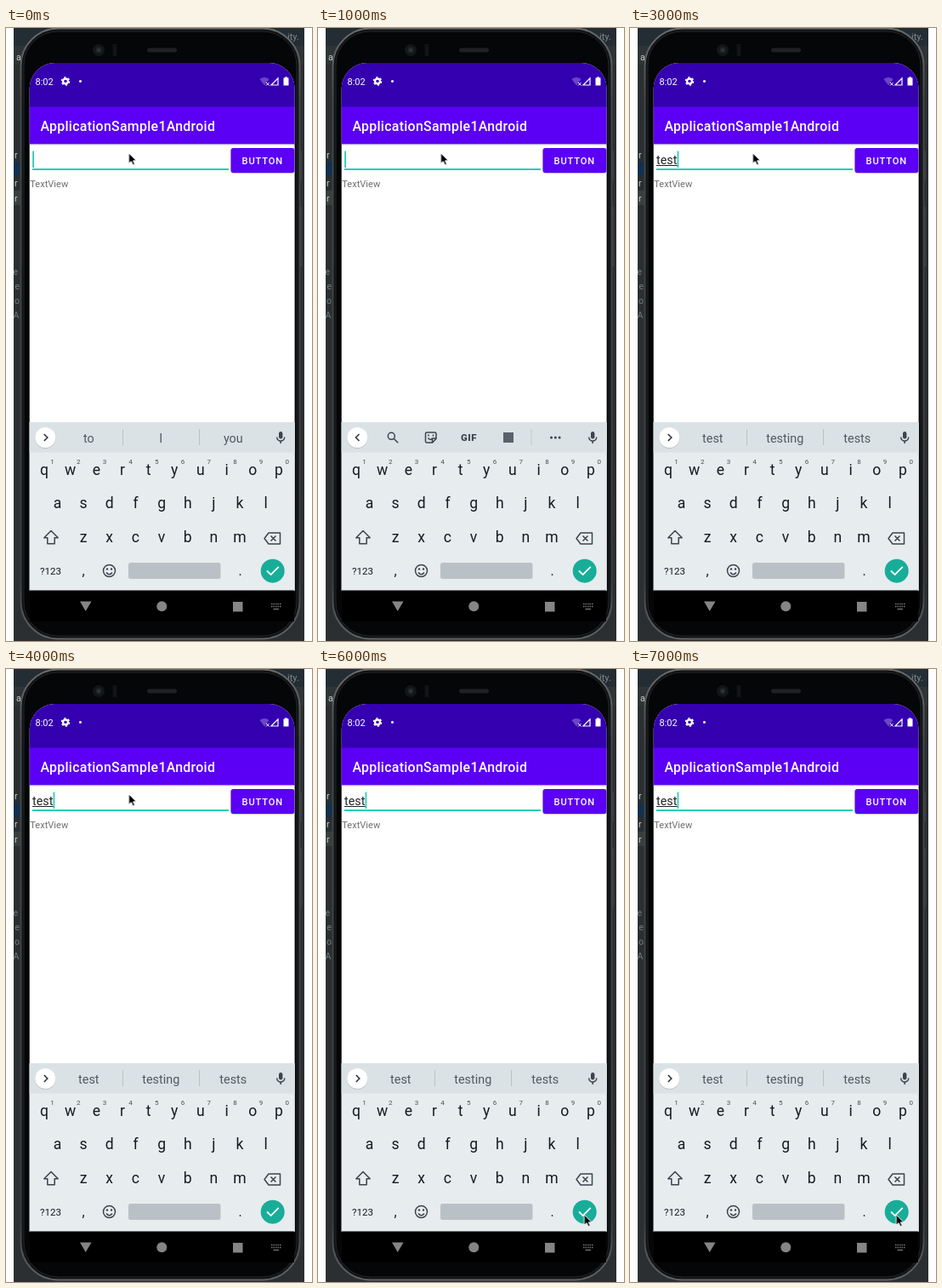
Animation of 360x720 px, one loop 8 s. Source, as an HTML page:

```html
<!DOCTYPE html>
<html lang="en">
<head>
<meta charset="utf-8">
<title>Typing on a phone</title>
<style>
html, body { margin: 0; width: 100%; height: 100%; overflow: hidden; background: #fff; }
svg { display: block; width: 360px; height: 720px; font-family: Roboto, sans-serif; }
.mid { text-anchor: middle; }
.line { fill: none; stroke: #3c454b; stroke-width: 1.5; }

/* Every change is a hard cut on an 8 s clock. */
.idle, .tools, .half, .full, .words, .caret, .mouse { animation: 8s step-end infinite; }
.idle { animation-name: idle; }
.tools { animation-name: tools; }
.words { animation-name: words; }
.half { animation-name: half; }
.full { animation-name: full; }
.caret { animation-name: caret; }
.mouse { animation-name: mouse; }
@keyframes idle { 0% { visibility: visible } 12.5%, 100% { visibility: hidden } }
@keyframes tools { 0% { visibility: hidden } 12.5% { visibility: visible } 25%, 100% { visibility: hidden } }
@keyframes words { 0% { visibility: visible } 12.5% { visibility: hidden } 25%, 100% { visibility: visible } }
@keyframes half { 0% { visibility: hidden } 25% { visibility: visible } 37.5%, 100% { visibility: hidden } }
@keyframes full { 0% { visibility: hidden } 37.5%, 100% { visibility: visible } }
@keyframes caret {
  0% { transform: translateX(0) }
  25% { transform: translateX(12px) }
  37.5%, 100% { transform: translateX(24.4px) }
}
@keyframes mouse {
  0% { transform: translate(144.5px, 147px) }
  62.5% { transform: translate(318.5px, 550.5px) }
  75%, 100% { transform: translate(313.2px, 641px) }
}
</style>
</head>
<body>
<svg viewBox="0 0 360 720">
  <defs>
    <clipPath id="stage"><rect x="9" width="342" height="720"/></clipPath>
    <clipPath id="screen"><path d="M27.700 661V71a30 30 0 0 1 30-30H309.600a30 30 0 0 1 30 30V661Z"/></clipPath>
    <linearGradient id="shade" x2="0" y2="1">
      <stop stop-color="#000" stop-opacity=".2"/><stop offset="1" stop-color="#000" stop-opacity="0"/>
    </linearGradient>
    <linearGradient id="rim" x2="0" y2="1">
      <stop stop-color="#6a6c6d"/><stop offset=".12" stop-color="#44474a"/>
      <stop offset=".9" stop-color="#3a3d3f"/><stop offset="1" stop-color="#606264"/>
    </linearGradient>
  </defs>

  <g clip-path="url(#stage)">
    <!-- editor behind the phone -->
    <rect x="9" width="342" height="720" fill="#2b2f31"/>
    <rect x="9" width="342" height="21" fill="#232d33"/>
    <rect x="9" y="21" width="342" height="22" fill="#2f3537"/>
    <rect x="9" y="157" width="9" height="17" fill="#12304b"/>
    <rect x="9" y="191" width="9" height="17" fill="#37413c"/>
    <g id="editor" font-size="10.5"></g>
    <text x="331" y="14" font-size="11" fill="#7e898f">ity.</text>

    <!-- phone body -->
    <rect x="17.500" y=".5" width="328" height="717" rx="44" fill="#111314" stroke="url(#rim)" stroke-width="2"/>
    <rect x="21" y="4" width="321" height="710" rx="40" fill="#050607" stroke="#222527"/>
    <path d="M347 144v35M347 210v70" stroke="#3b3f42" stroke-width="2"/>
    <circle cx="109" cy="26" r="7" fill="#131517"/>
    <circle cx="109" cy="26" r="3.400" fill="#22262a"/>
    <circle cx="109" cy="26" r="1.300" fill="#3b4148"/>
    <path d="M128 19v14" stroke="#111315" stroke-width="5"/>
    <rect x="166" y="23.500" width="35" height="5" rx="2.500" fill="#1f2123"/>
  </g>

  <g clip-path="url(#screen)">
    <rect x="27" y="41" width="313" height="620" fill="#fff"/>
    <rect x="27" y="41" width="313" height="52" fill="#3400b0"/>
    <rect x="27" y="92.500" width="313" height="43.800" fill="#5b00f4"/>
    <rect x="27" y="136.300" width="313" height="2.200" fill="url(#shade)"/>

    <!-- status bar -->
    <g fill="#fff">
      <text x="34.500" y="66.700" font-size="11">8:02</text>
      <circle cx="70" cy="62.500" r="2.900" fill="none" stroke="#fff" stroke-width="2.200"/>
      <circle cx="70" cy="62.500" r="4.500" fill="none" stroke="#fff" stroke-width="1.600" stroke-dasharray="2.350 2.362"/>
      <circle cx="87.500" cy="62.500" r="1.500"/>
      <path d="M298.500 60q5.500-4 11 0l-5.500 7.500z" opacity=".27"/>
      <path d="M306 64l3.500 3.500m0-3.500l-3.500 3.500" stroke="#fff"/>
      <path d="M312 67l8-8v8z" fill="none" stroke="#fff" stroke-width="1.200"/>
      <path d="M326.500 58.500h1.500v-1h3v1h1.500v9h-6z"/>
    </g>
    <text x="40.500" y="121" font-size="15.900" font-weight="500" letter-spacing=".29" fill="#fff">ApplicationSample1Android</text>

    <!-- form -->
    <rect x="31" y="165" width="231" height="2" fill="#25cdb9"/>
    <g font-size="14.300" fill="#202020">
      <g class="half"><text x="31" y="160">te</text><path d="M31 161.500h13" stroke="#202020"/></g>
      <g class="full"><text x="31" y="160">test</text><path d="M31 161.500h25" stroke="#202020"/></g>
    </g>
    <rect class="caret" x="31.200" y="144.500" width="1.800" height="19.500" fill="#25cdb9"/>
    <rect x="264.500" y="142" width="75" height="29" rx="3" fill="#000" opacity=".22"/>
    <rect x="264.500" y="141" width="75" height="29" rx="3" fill="#5b00f4"/>
    <text x="277.500" y="159.700" font-size="11.100" font-weight="500" letter-spacing=".9" fill="#fff">BUTTON</text>
    <text x="28.200" y="186.800" font-size="11.100" fill="#6f6f6f">TextView</text>

    <!-- keyboard -->
    <rect x="27" y="463" width="313" height="198" fill="#e7ecef"/>
    <rect x="27" y="463" width="313" height="35.500" fill="#dbe2e5"/>
    <circle cx="46.300" cy="481.700" r="12.300" fill="#000" opacity=".13"/>
    <circle cx="46.300" cy="481" r="12" fill="#fff"/>
    <g fill="none" stroke="#2f363b" stroke-width="1.600">
      <path class="words" d="M44.800 477l4 4-4 4"/>
      <path class="tools" d="M48.500 477l-4 4 4 4"/>
    </g>
    <path class="words" d="M137.500 471v19M227.500 471v19" stroke="#bac2c6"/>
    <g id="hints" class="mid" font-size="14.400" fill="#515a60"></g>
    <g class="tools">
      <circle class="line" cx="86.300" cy="479.300" r="4"/>
      <path class="line" d="M89.200 482.200l5 5"/>
      <path class="line" d="M128 475h9.500a1.500 1.500 0 0 1 1.500 1.500v6l-4.500 4.500h-6.500a1.500 1.500 0 0 1-1.500-1.500v-9a1.500 1.500 0 0 1 1.500-1.500zM138.500 482h-4v4.500M129.500 481.500q2.500 3.500 5 .5"/>
      <path d="M130 477.500v2M135.500 477.500v2" stroke="#3c454b" stroke-width="1.500"/>
      <text class="mid" x="177.500" y="485" font-size="11.400" font-weight="900" letter-spacing=".6" fill="#3c454b">GIF</text>
      <rect x="218" y="475" width="12" height="12" fill="#596268"/>
      <path d="M251 471v19" stroke="#c3cbcf"/>
      <path d="M274.500 481h.01m4.800 0h.01m4.800 0h.01" stroke="#3c454b" stroke-width="3" stroke-linecap="round"/>
    </g>
    <rect x="321" y="474" width="4.400" height="8.500" rx="2.200" fill="#3c454b"/>
    <path class="line" d="M318.700 480.500a4.500 4.500 0 0 0 9 0M323.200 485v3"/>

    <g id="keys" class="mid" fill="#141c21"></g>
    <path class="line" d="M53 590.500l-8.200 8.300h4v7h8.400v-7h4z" stroke-linejoin="round"/>
    <path class="line" d="M309 593h13.500v13h-13.500l-5-6.500zM311.500 596.500l6 6m0-6l-6 6" stroke-linejoin="round"/>
    <circle class="line" cx="121.500" cy="637.500" r="7"/>
    <path class="line" d="M118 639.500q3.500 4.500 7 0"/>
    <circle cx="119" cy="635.500" r="1.200" fill="#3c454b"/><circle cx="124" cy="635.500" r="1.200" fill="#3c454b"/>
    <rect x="144" y="628" width="108.500" height="19" rx="2.500" fill="#bac1c6"/>
    <circle cx="313.700" cy="637.700" r="14" fill="#18ad99"/>
    <path d="M307 637.500l4.600 4.600 9.200-9.200" fill="none" stroke="#fff" stroke-width="1.800"/>
  </g>

  <!-- navigation bar -->
  <rect x="28" y="660.500" width="311" height="36.500" fill="#000"/>
  <g fill="#858585">
    <path d="M87 673.500h13.500l-6.750 11.500z"/>
    <circle cx="183.300" cy="679.300" r="6"/>
    <rect x="267" y="674" width="11.500" height="11.500"/>
  </g>
  <path d="M312 676.500h11.500M312 679.500h11.500" stroke="#777" stroke-width="1.500" stroke-dasharray="1.500 1"/>
  <path d="M314.500 682.500h6.500" stroke="#777" stroke-width="1.300"/>

  <path class="mouse" d="M0 0V12.200L2.900 9.600 4.900 14 7 13.100 5.100 8.800H8.800Z" fill="#000" stroke="#fff" stroke-width=".9"/>
</svg>
<script>
const add = (id, x, y, str, size, cls) => {
  const t = document.createElementNS("http://www.w3.org/2000/svg", "text");
  t.setAttribute("x", x);
  t.setAttribute("y", y);
  if (size) t.setAttribute("font-size", size);
  if (cls) t.setAttribute("class", cls);
  t.textContent = str;
  document.getElementById(id).append(t);
  return t;
};

const row = (letters, x, y) =>
  [...letters].forEach((c, i) => add("keys", x + i * 30.65, y, c, 17.6));

row("qwertyuiop", 45, 524.5);
row("asdfghjkl", 60.5, 564.3);
row("zxcvbnm", 91, 604.3);
[..."1234567890"].forEach((c, i) =>
  add("keys", 54.5 + i * 30.7, 511.7, c, 8).setAttribute("fill", "#454e54"));
add("keys", 52.5, 641.7, "?123", 11.6);
add("keys", 91, 642.5, ",", 16);
add("keys", 275.5, 642.5, ".", 16);

const hints = { idle: ["to", "I", "you"], half: ["te", "the", "test"], full: ["test", "testing", "tests"] };
for (const cls in hints)
  hints[cls].forEach((word, i) => add("hints", 97.3 + i * 85, 486.5, word, 0, cls));

const scraps = [["a", 12, 38], ["r", 10, 153], ["r", 10, 186], ["r", 10, 204],
  ["e", 8.5, 290], ["e", 10.5, 307], ["o", 10, 324], ["A", 8.5, 341]];
for (const [c, x, y] of scraps)
  add("editor", x, y, c).setAttribute("fill", y > 250 ? "#737c80" : "#c4cbce");
</script>
</body>
</html>
```
